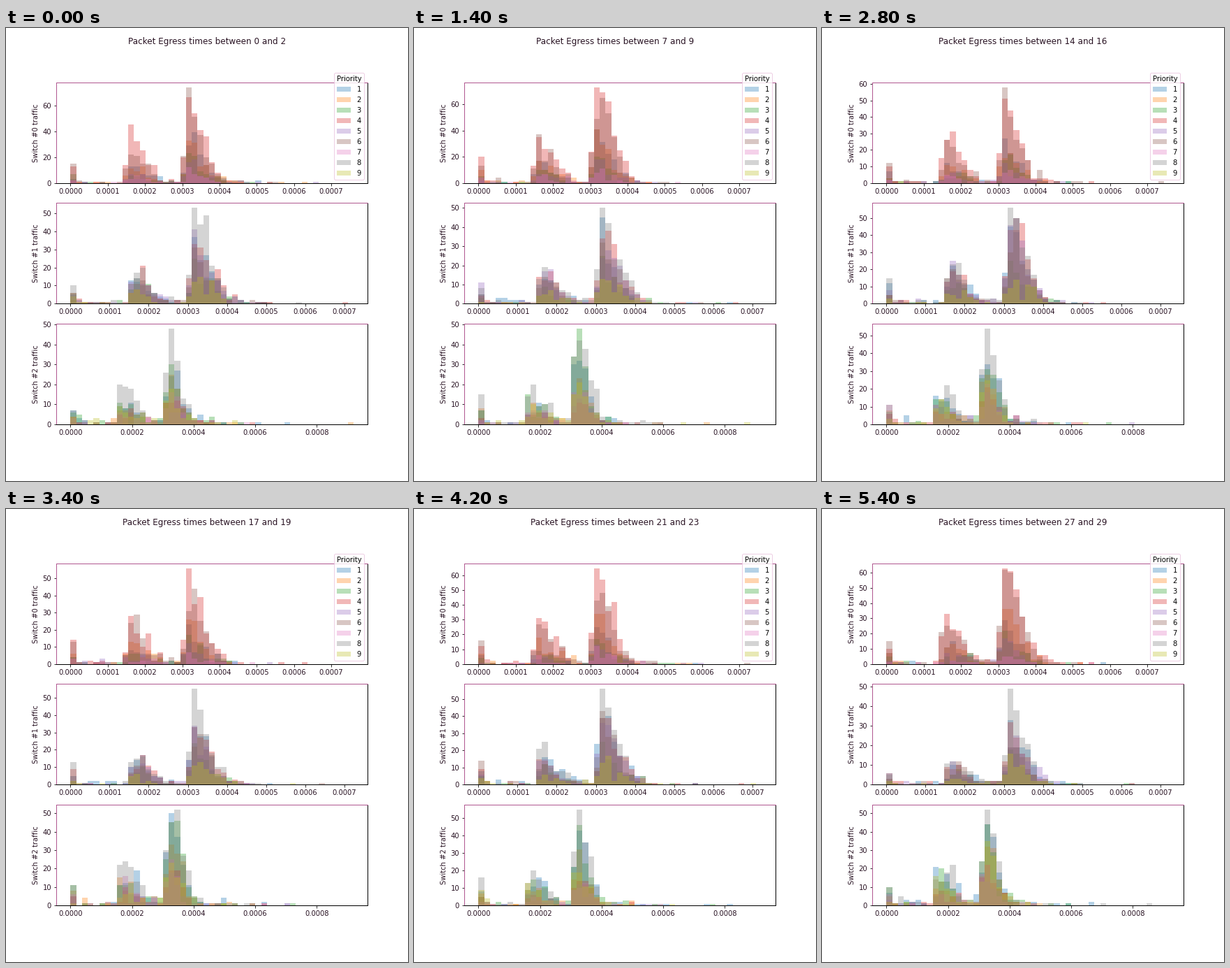
Write a matplotlib script that moves like this. It is 576 px wide and 648 px high and loops after 5600 ms.

```python
import numpy as np
import matplotlib.pyplot as plt
from matplotlib.animation import FuncAnimation
from matplotlib.patches import Patch

plt.rcParams.update({"font.family": "DejaVu Sans", "font.size": 10,
                     "axes.linewidth": 1.0})

FRAMES, BINS = 28, 49
ALPHA = 0.335
INK, EDGE = "#2a1424", "#b05890"
COLORS = [f"C{i}" for i in range(9)]
BIN = np.arange(BINS)

# Key times for the tallest bar of each switch, in seconds
PEAK_TIMES = (0, 4, 7, 11, 17, 21, 27)

# humps: (peak bin, relative height, decay width, relative height of the bin before)
SWITCHES = [
    dict(longest=7.599e-4, humps=[(10, .43, 3.6, .37), (20, 1, 3.2, .3)],
         shares=(.42, .45, .25, 1, .2, .85, .1, 0, 0),
         peaks=(74, 89, 73, 59, 56, 65, 63)),
    dict(longest=7.235e-4, humps=[(11, .4, 3.0, .75), (21, 1, 3.6, .35)],
         shares=(.75, 0, .4, .75, .7, .6, 0, 1, .27),
         peaks=(53, 53, 50, 57, 55, 56, 49)),
    dict(longest=9.195e-4, humps=[(9, .35, 3.0, .9), (17, 1, 2.3, .63)],
         shares=(.68, .5, .7, .33, .25, 0, .33, 1, .42),
         peaks=(48, 42, 48, 55, 52, 55, 52)),
]


def hump(peak, height, width, onset):
    """Steep rise into the peak bin, then a rounded fall."""
    after = np.maximum(BIN - peak, 0) / width
    fall = np.where(BIN >= peak, np.exp(-after ** 1.6), 0)
    return height * (fall + onset * (BIN == peak - 1))


def stray(humps):
    """Rate of the few packets outside the humps."""
    last = humps[-1][0] + 5
    rate = 0.6 * np.exp(-np.maximum(BIN - last, 0) / 6) + 2 * np.exp(-BIN / 0.8)
    for peak, height, *_ in humps:
        after = BIN - peak - 3
        rate += np.where(after > 0, 4 * np.exp(-np.maximum(after, 0) / 2), 0)
    return rate


def windows(humps, shares, peaks, rng):
    """Counts per two-second window, priority and bin."""
    shares = np.array(shares)[:, None]
    shape = sum(hump(*h) for h in humps) + 0.2 * (BIN == 0)
    base = np.sqrt(shares) * stray(humps)
    tops = np.interp(np.arange(FRAMES + 1), PEAK_TIMES, peaks)
    rates = [np.maximum(top * shares * shape, base) / 2 for top in tops]
    seconds = rng.poisson(rates)
    counts = seconds[:-1] + seconds[1:]
    scale = np.round(tops[:-1]) / counts.max(axis=(1, 2))
    return np.round(counts * scale[:, None, None])


rng = np.random.default_rng(12)
fig, axes = plt.subplots(3, 1, figsize=(8, 9), dpi=72)
fig.subplots_adjust(left=0.125, right=0.9, bottom=0.125, top=0.88, hspace=0.2)
title = fig.suptitle("", fontsize=12, color=INK)

panels = []
for n, (ax, switch) in enumerate(zip(axes, SWITCHES)):
    longest = switch["longest"]
    edges = np.linspace(0, longest, BINS + 1)
    steps = [ax.stairs(np.zeros(BINS), edges, fill=True, color=c, alpha=ALPHA,
                       linewidth=0) for c in COLORS]
    ax.set_xlim(-0.05 * longest, 1.05 * longest)
    ax.set_ylabel(f"Switch #{n} traffic", color=INK)
    ax.tick_params(labelcolor=INK)
    for side in ("top", "left"):
        ax.spines[side].set_color(EDGE)
    counts = windows(switch["humps"], switch["shares"], switch["peaks"], rng)
    panels.append((ax, steps, counts))

keys = [Patch(facecolor=c, alpha=ALPHA, linewidth=0, label=str(i))
        for i, c in enumerate(COLORS, 1)]
axes[0].legend(handles=keys, title="Priority", loc="lower right", edgecolor="#eac4de")


def update(i):
    title.set_text(f"Packet Egress times between {i} and {i + 2}")
    for ax, steps, counts in panels:
        for step, values in zip(steps, counts[i]):
            step.set_data(values=values)
        ax.set_ylim(0, 1.05 * counts[i].max())


anim = FuncAnimation(fig, update, frames=FRAMES, interval=200, repeat=True,
                     repeat_delay=0, init_func=lambda: update(0))
plt.show()
```
